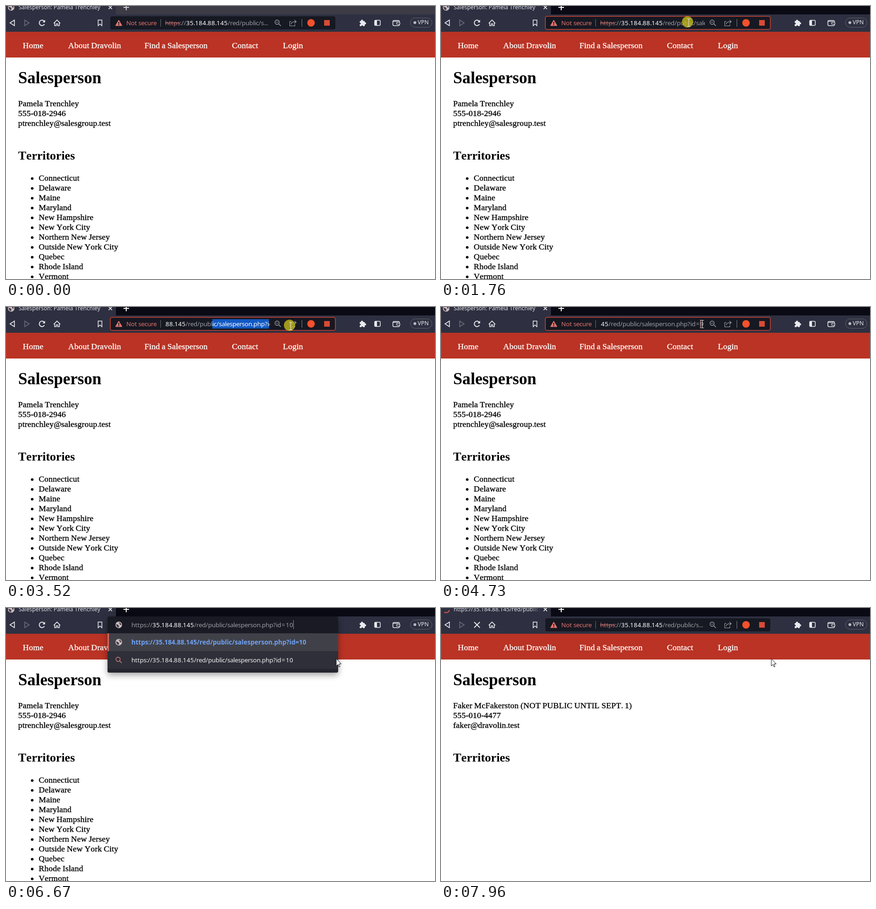
Recreate the animation shown at these times as an HTML page with a canvas. Size 917 px wide and 583 px high, loop 8000 ms.

```html
<!DOCTYPE html>
<html lang="en">
<head>
<meta charset="utf-8">
<title>Browser session</title>
<style>
html, body { margin: 0; width: 100%; height: 100%; overflow: hidden; background: #fff; }
canvas { display: block; }
</style>
</head>
<body>
<canvas id="stage" width="917" height="583"></canvas>
<script>
const g = document.getElementById('stage').getContext('2d');
const LOOP = 8000;
const SANS = '"Noto Sans", "Open Sans", sans-serif';
const SERIF = '"Liberation Serif", "Times New Roman", serif';
const UI = '13.33px ' + SANS;
const BODY = '17.6px ' + SERIF;
const HOST = '35.184.88.145';
const PATH = '/red/public/salesperson.php?id=';
const GRAY = '#9b9ca4', DIM = '#a2a3ab', WHITE = '#fff', ICON = '#e9e9ee', PINK = '#e2736d';
const TOOLBAR = '#2e3041', FIELD = '#161822';
const STATES = ['Connecticut', 'Delaware', 'Maine', 'Maryland', 'New Hampshire',
  'New York City', 'Northern New Jersey', 'Outside New York City', 'Quebec',
  'Rhode Island', 'Vermont'];

// time, x, y of the pointer hot spot
const TRACK = [
  [790, 234, 550], [1000, 410, 390], [1270, 684, 150], [1540, 530, 26],
  [1620, 529, 35], [3030, 529, 35], [3370, 608, 40], [3850, 608, 40],
  [4180, 557, 49], [4390, 557, 49], [4460, 558, 40], [4660, 558, 40],
  [4730, 558, 36], [4990, 558, 36], [5060, 554, 34], [5190, 554, 34],
  [5740, 706, 104], [5810, 706, 108]
];

function rect(x, y, w, h, color) {
  g.fillStyle = color;
  g.fillRect(x, y, w, h);
}
function round(x, y, w, h, r, fill, stroke, lw = 1) {
  g.beginPath();
  g.roundRect(x, y, w, h, r);
  if (fill) { g.fillStyle = fill; g.fill(); }
  if (stroke) { g.strokeStyle = stroke; g.lineWidth = lw; g.stroke(); }
}
function disc(x, y, r, color) {
  g.fillStyle = color;
  g.beginPath();
  g.arc(x, y, r, 0, Math.PI * 2);
  g.fill();
}
function line(points, color, lw = 1.5, close = false, fill = null) {
  g.beginPath();
  points.forEach(([x, y], i) => i ? g.lineTo(x, y) : g.moveTo(x, y));
  if (close) g.closePath();
  if (fill) { g.fillStyle = fill; g.fill(); }
  if (color) { g.strokeStyle = color; g.lineWidth = lw; g.stroke(); }
}
function arc(x, y, r, from, to, color, lw = 1.6) {
  g.strokeStyle = color;
  g.lineWidth = lw;
  g.beginPath();
  g.arc(x, y, r, from, to);
  g.stroke();
}
function label(text, x, y, font, color) {
  g.font = font;
  g.fillStyle = color;
  g.fillText(text, x, y);
}

// Whole-pixel advances, as in hinted desktop text; serif stems are a little heavier
function snapped(text, x, y, font, color) {
  const serif = font === BODY;
  g.font = font;
  g.fillStyle = g.strokeStyle = color;
  g.lineWidth = 0.4;
  for (const c of text) {
    const pad = c === '=' ? 1 : 0;
    g.fillText(c, x + pad, y);
    if (serif) g.strokeText(c, x, y);
    x += Math.round(g.measureText(c).width - 0.08) + 2 * pad;
  }
  return x;
}

function globe(x, y) {
  disc(x, y, 7, '#c9bfc2');
  line([[x - 6, y - 2], [x - 1, y], [x + 1, y + 3], [x - 1, y + 6], [x - 4, y + 4]], null, 1, true, '#4a3d45');
  line([[x - 1, y - 5], [x + 3, y - 5], [x + 6, y], [x + 2, y], [x + 2, y - 3]], null, 1, true, '#4a3d45');
}
function lens(x, y, color) {
  arc(x - 1.5, y - 1.5, 4.5, 0, 7, color, 1.3);
  line([[x + 2, y + 2], [x + 6.5, y + 6.5]], color, 1.4);
}
function cross(x, y, r, color, lw) {
  line([[x - r, y - r], [x + r, y + r]], color, lw);
  line([[x - r, y + r], [x + r, y - r]], color, lw);
}

function tabs(t) {
  const active = t >= 1760, loading = t >= 7550;
  rect(0, 0, 917, 18, active ? '#090a14' : '#3c3b46');
  round(-8, -10, 243, 30, 4, TOOLBAR);
  if (loading) {
    const a = (t - 7960) / 160 + 0.2;
    arc(11, 3, 7, a, a + 2, '#d0564c', 2);
  } else globe(11, 3);
  g.save();
  g.beginPath();
  g.rect(27, 0, 185, 18);
  g.clip();
  label(loading ? 'https://' + HOST + PATH : 'Salesperson: Pamela Trenchley', 27, 7, '12px ' + SANS, '#dedee4');
  g.restore();
  if (loading) {
    const fade = g.createLinearGradient(190, 0, 213, 0);
    fade.addColorStop(0, 'rgba(46,48,65,0)');
    fade.addColorStop(1, TOOLBAR);
    rect(190, 0, 23, 17, fade);
  }
  cross(223, 3, 3.6, ICON, 1.6);
  const plus = active ? WHITE : '#cfcfd6';
  rect(251, 2, 12, 2, plus);
  rect(256, -3, 2, 12, plus);
}

function toolbar(t) {
  rect(0, 18, 917, 37, TOOLBAR);
  line([[18, 30], [8.5, 36], [18, 42]], ICON, 1.6, true);
  line([[40, 30], [49.5, 36], [40, 42]], '#696b78', 1.6, true);
  if (t >= 7550) cross(77, 36, 6, ICON, 1.8);
  else {
    arc(77, 36, 5.8, 0.5, 5.6, ICON, 1.9);
    line([[83.5, 29.5], [83.5, 35], [78, 35]], null, 1, true, ICON);
  }
  line([[102, 37], [109, 30], [116, 37]], ICON, 1.7);
  line([[104, 35.5], [104, 42], [107.5, 42], [107.5, 38], [110.5, 38], [110.5, 42], [114, 42], [114, 35.5]], ICON, 1.6);
  line([[197, 30], [205, 30], [205, 42], [201, 38.5], [197, 42]], ICON, 1.5, true);

  // puzzle, side panel, wallet, pill
  round(756, 32, 11, 11, 1.5, ICON);
  disc(761, 31.5, 2.3, ICON);
  disc(767.5, 37, 2.3, ICON);
  disc(756.5, 37.5, 1.8, TOOLBAR);
  disc(761.5, 43, 1.8, TOOLBAR);
  round(788, 30.5, 12, 11, 2, null, ICON, 1.5);
  rect(788, 31, 5, 10, ICON);
  round(827, 31, 14, 11, 2.5, null, ICON, 1.5);
  line([[828, 33], [839, 33]], ICON, 1.2);
  round(835, 35, 7, 4, 1, TOOLBAR, ICON, 1.2);
  round(864.5, 25.5, 46, 20, 10, null, '#61636f');
  disc(874, 35.5, 3, '#b9bac2');
  label('VPN', 880, 39, '12px ' + SANS, ICON);
}

function scrollAt(t) {
  if (t < 3380 || t >= 7550) return 0;
  return t < 3450 ? 45 : t < 3590 ? 90 : 116;
}
function urlText(x, path, plain) {
  const end = snapped('https', x, 41, UI, plain || '#b9716e');
  if (!plain) rect(x, 36, end - x, 1, '#d0746e');
  x = snapped('://', end, 41, UI, plain || GRAY);
  x = snapped(HOST, x, 41, UI, WHITE);
  return snapped(path, x, 41, UI, plain || GRAY);
}
function clipped(x, w, draw) {
  g.save();
  g.beginPath();
  g.rect(x, 24, w, 24);
  g.clip();
  draw();
  g.restore();
}

function addressBar(t, p) {
  const focus = t >= 1760 && t < 7550;
  round(223, 22, 481, 28, 4, FIELD);
  if (focus) round(223, 22, 481, 28, 4, null, '#a33b30', 2);

  line([[241, 30], [248, 42], [234, 42]], PINK, 1, true, PINK);
  rect(240, 34, 2, 4, FIELD);
  rect(240, 39, 2, 2, FIELD);
  snapped('Not secure', 257, 41, UI, PINK);
  rect(330, 28, 1, 16, '#6d6e78');

  if (!focus) urlText(340, '/red/public/s...');
  else {
    const x = 340 - scrollAt(t);
    clipped(340, 224, () => urlText(x, PATH + '9'));
    let from = 0, to = 562;
    if (t >= 3030 && t < 4390) {
      from = 531 - scrollAt(t);
      to = Math.min(562, p.x);
    } else if (t >= 5060) from = 554;
    if (from && to > from) {
      rect(from, 26, to - from, 20, '#1259c3');
      clipped(from, to - from, () => snapped('https://' + HOST + PATH + '9', x, 41, UI, WHITE));
    }
    const caretOn = (t >= 2290 && t < 2890) || (t >= 4460 && t < 5060);
    if (caretOn) rect(t < 3000 ? 528 : 554, 27, 1, 18, '#e8b0aa');
  }

  lens(581, 36, DIM);
  line([[577, 34.5], [582, 34.5]], DIM, 1);
  line([[610, 33], [606.5, 33], [606.5, 42.5], [617.5, 42.5], [617.5, 39]], DIM, 1.1);
  line([[609.5, 39], [611, 35.5], [615, 33.5], [620, 33.5]], DIM, 1.1);
  line([[616.5, 30], [620.5, 33.5], [616.5, 37]], DIM, 1.1);
  rect(632, 28, 1, 16, '#85868f');
  disc(652, 36, 8, '#f4512c');
  rect(680, 30, 12, 12, '#d94a35');
}

function nav() {
  rect(0, 55, 917, 55, '#ba3324');
  [['Home', 36], ['About Dravolin', 133], ['Find a Salesperson', 296], ['Contact', 483], ['Login', 592]]
    .forEach(([s, x]) => snapped(s, x, 90, BODY, WHITE));
}

function page(t) {
  rect(0, 0, 917, 583, '#fff');
  nav();
  const done = t >= 7760;
  label('Salesperson', 26, 165, 'bold 35.2px ' + SERIF, '#000');
  label('Territories', 26, 328, 'bold 26px ' + SERIF, '#000');
  const lines = done
    ? ['Faker McFakerston (NOT PUBLIC UNTIL SEPT. 1)', '555-010-4477', 'faker@dravolin.test']
    : ['Pamela Trenchley', '555-018-2946', 'ptrenchley@salesgroup.test'];
  lines.forEach((s, i) => snapped(s, 26, 214 + i * 21, BODY, '#000'));
  if (done) return;
  STATES.forEach((s, i) => {
    disc(56, 368.5 + i * 21, 2.8, '#000');
    snapped(s, 70, 373 + i * 21, BODY, '#000');
  });
}

function suggestions(t) {
  const id = t < 6670 ? '1' : '10', full = 'https://' + HOST + PATH + id;
  g.save();
  g.shadowColor = 'rgba(0,0,0,.38)';
  g.shadowBlur = 14;
  g.shadowOffsetY = 5;
  round(217, 18, 493, 120, 4, '#2e2f38');
  g.restore();
  round(217, 18, 493, 37, [4, 4, 0, 0], '#191a23');
  rect(217, 54, 493, 38, '#404148');
  rect(217, 54, 3, 38, '#d9655e');
  round(217, 130, 493, 8, [0, 0, 4, 4], '#24252e');
  globe(241, 36);
  globe(241, 73);
  lens(241, 111, '#dc8580');
  const end = urlText(268, PATH + id, GRAY);
  if (t < 7210) rect(end, 26, 1, 19, '#e2736d');
  label(full, 268, 78, 'bold 13.55px ' + SANS, '#6ea2f5');
  snapped(full, 268, 116, UI, '#f2f2f5');
}

function pointerAt(t) {
  const q = 790 + Math.floor((t - 790) / 69) * 69;
  const i = TRACK.findIndex(k => k[0] > q);
  if (i < 0) return { x: 706, y: 108 };
  const a = TRACK[Math.max(0, i - 1)], b = TRACK[i];
  const u = i ? (q - a[0]) / (b[0] - a[0]) : 0;
  return { x: Math.round(a[1] + (b[1] - a[1]) * u), y: Math.round(a[2] + (b[2] - a[2]) * u) };
}
function pointer(t, { x, y }) {
  if (t < 790) return;
  const pressed = (t >= 1760 && t < 2290) || (t >= 2690 && t < 3850) || (t >= 4990 && t < 5190);
  if (pressed) disc(x - 2, y - 1, 12, 'rgba(190,180,24,.82)');
  if (t < 1620 || (t > 5190 && y > 50)) {
    line([[x, y], [x, y + 16], [x + 3.5, y + 12.5], [x + 6, y + 18], [x + 8, y + 17],
      [x + 5.8, y + 11.5], [x + 10.5, y + 11.5]], '#15151c', 1, true, '#fff');
    return;
  }
  const c = '#e4e4e4';
  line([[x + 0.5, y - 7], [x + 0.5, y + 8]], c, 1);
  for (const dy of [-7.5, 8.5]) line([[x - 3, y + dy], [x + 4, y + dy]], c, 1);
}

function draw(t) {
  const p = pointerAt(t);
  page(t);
  tabs(t);
  toolbar(t);
  addressBar(t, p);
  if (t >= 6600 && t < 7550) suggestions(t);
  pointer(t, p);
}

g.fontKerning = 'none';
const start = performance.now();
function tick() {
  draw((performance.now() - start) % LOOP);
  requestAnimationFrame(tick);
}
tick();
</script>
</body>
</html>
```
